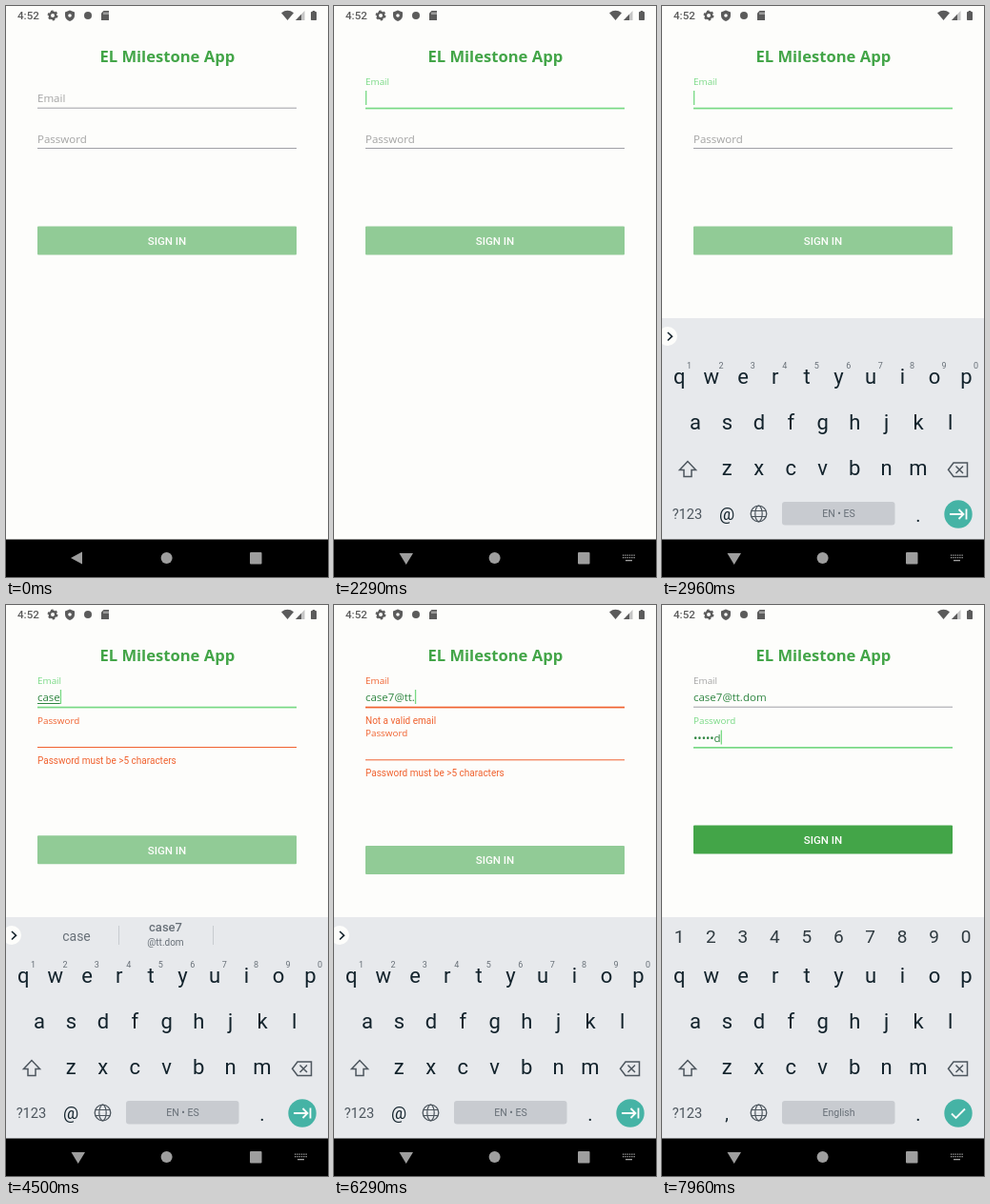
These frames come from a looping animation (338x600 px, 8 s). An HTML page:

```html
<!DOCTYPE html>
<html lang="en">
<head>
<meta charset="utf-8">
<title>Sign in</title>
<style>
html, body { margin: 0; width: 100%; height: 100%; overflow: hidden; background: #fdfdfb; }
svg { display: block; }
text { font-family: Roboto, sans-serif; }
.os { font-family: "Open Sans", sans-serif; }
.mid { text-anchor: middle; }
.med { font-weight: 500; }
.bold { font-weight: 700; }
</style>
</head>
<body>
<svg id="stage" width="338" height="600" viewBox="0 0 338 600"></svg>
<script>
const LOOP = 8000, FOCUS = 2080, NEXT = 6900;
const EMAIL = "case7@tt.dom";
const EMAIL_KEYS = [3220, 3580, 3950, 4330, 4830, 5190, 5540, 5800, 6130, 6420, 6560, 6710];
const PASS = "passwd";
const PASS_KEYS = [7120, 7290, 7460, 7620, 7790, 7920];
const C = {
  back: "#fdfdfb", hint: "#a3a3a3", line: "#a0a0a6", light: "#78d984", dark: "#2e8540",
  green: "#43a548", pale: "#91cb96", error: "#f0622f", icon: "#9e9e9e", status: "#5b5b5b",
  board: "#e7e9ec", space: "#c8cbd0", key: "#13232c", soft: "#687078", grey: "#4d565e"
};
const stage = document.getElementById("stage");
const pen = document.createElement("canvas").getContext("2d");

const text = (x, y, s, size, fill, cls = "") =>
  `<text x="${x}" y="${y}" font-size="${size}" fill="${fill}" class="${cls}">${s}</text>`;
const rect = (x, y, w, h, fill, r = 0) =>
  `<rect x="${x}" y="${y}" width="${w}" height="${h}" fill="${fill}" rx="${r}"/>`;
const circle = (x, y, r, fill, more = "") =>
  `<circle cx="${x}" cy="${y}" r="${r}" fill="${fill}" ${more}/>`;
const path = (d, fill) => `<path d="${d}" fill="${fill}"/>`;
const stroke = (d, color, w = 1.5) =>
  `<path d="${d}" fill="none" stroke="${color}" stroke-width="${w}"/>`;

const clamp = p => Math.min(1, Math.max(0, p));
const ramp = (t, start, length) => {
  const p = clamp((t - start) / length);
  return p * p * (3 - 2 * p);
};
const typed = (keys, t) => keys.filter(k => k <= t).length;
const width = s => {
  pen.font = '11.5px "Open Sans", sans-serif';
  return pen.measureText(s).width;
};

function statusBar() {
  const c = C.status;
  return text(12, 14.2, "4:52", 11.6, c, "med")
    + circle(49, 10, 3.2, "none", `stroke="${c}" stroke-width="2.4"`)
    + circle(49, 10, 4.6, "none", `stroke="${c}" stroke-width="1.7" stroke-dasharray="2.4 2.4"`)
    + path("M67 4.5L72 6.5V10Q72 14 67 16Q62 14 62 10V6.5Z", c)
    + circle(67, 10, 1.8, C.back)
    + circle(86, 10, 4, c)
    + path("M102.5 5H108V15H100V7.5Z", c)
    + stroke("M103 6.5V9M105 6.5V9M107 6.5V9", C.back, .8)
    + path("M289 7.2Q295.5 2.5 302 7.2L295.5 15Z", c)
    + path("M304 15L313.5 5V15Z", "#c4c4c4")
    + path("M304 15L310 8.7V15Z", c)
    + rect(320, 6, 6, 9, c, .7) + rect(321.7, 5, 2.6, 1.5, c);
}

function navBar(open) {
  let s = rect(0, 560.5, 338, 39.5, "#000")
    + path(open ? "M68.5 575H83L75.7 587Z" : "M68 580L80 573.5V586.5Z", C.icon)
    + circle(168.6, 580, 6, C.icon) + rect(256, 574, 12.5, 12.5, C.icon, 1);
  if (open) {
    for (let i = 0; i < 12; i++)
      s += rect(303 + i % 6 * 2.3, 576.5 + Math.floor(i / 6) * 2.5, 1.3, 1.3, C.icon);
    s += rect(306, 582, 7, 1.3, C.icon);
  }
  return s;
}

function keyRow(keys, x, y) {
  return [...keys].map((k, i) => text(x + i * 33.45, y, k, 22, C.key, "mid")).join("");
}

function strip(word) {
  let s = circle(6, 347, 10, C.back) + stroke("M6 343L10.5 347.2L6 351.5", C.key, 1.6);
  if (word && !word.includes("@")) {
    s += text(74, 353, word, 14, C.soft, "mid")
      + text(167.5, 343, EMAIL.slice(0, 5), 13, C.soft, "mid med")
      + text(167.5, 357.5, EMAIL.slice(5), 10, C.soft, "mid")
      + rect(118, 337, 1, 20, C.space) + rect(217, 337, 1, 20, C.space);
  }
  return s;
}

function keyboard(onPass, word) {
  const { grey } = C, digits = [..."1234567890"];
  let s = rect(0, 328, 338, 233, C.board);
  s += onPass
    ? digits.map((d, i) => text(18 + i * 33.45, 355, d, 19, "#2f3a40", "mid")).join("")
    : strip(word) + digits.map((d, i) => text(28.5 + i * 33.45, 380.5, d, 9, C.soft, "mid")).join("");
  s += keyRow("qwertyuiop", 18.3, 396.5) + keyRow("asdfghjkl", 35, 444.5) + keyRow("zxcvbnm", 68.3, 493);
  s += stroke("M27 478.5L18.5 487.5H23V494.5H31V487.5H35.5Z", grey)
    + stroke("M306 480H320.5V494.5H306L300.5 487.2ZM308.5 483.5L316 491M316 483.5L308.5 491", grey)
    + text(26.5, 539, "?123", 14.7, grey, "mid")
    + text(68, onPass ? 541 : 539.5, onPass ? "," : "@", 18, C.key, "mid");
  s += circle(101.5, 533.5, 8.3, "none", `stroke="${grey}" stroke-width="1.3"`)
    + `<ellipse cx="101.5" cy="533.5" rx="3.7" ry="8.3" fill="none" stroke="${grey}" stroke-width="1.2"/>`
    + stroke("M94 530.5H109M94 536.5H109", grey, 1.2);
  s += rect(126, 521, 118.5, 24.5, C.space, 3)
    + text(185.5, 537, onPass ? "English" : "EN • ES", 10.5, C.soft, "mid")
    + text(269, 541.5, ".", 20, C.key, "mid")
    + circle(311, 534, 14.7, "#45b3a5");
  return s + (onPass
    ? stroke("M304 534.5L308.5 539L318 529.5", C.back, 1.8)
    : stroke("M302 534H316M311.5 529L316.5 534L311.5 539M319.5 528.5V539.5", C.back, 1.8));
}

// Hint that shrinks and rises above its line as p goes from 0 to 1
const label = (s, y, p, fill) => text(33, y - 18.5 * p, s, 11.5 - 1.65 * p, fill, "os");
const caret = (s, y) => rect(33 + width(s), y - 12, 1.3, 15, C.light);
const warning = (s, y, p) => `<g opacity="${p}">${text(33, y - 4 * (1 - p), s, 10, C.error)}</g>`;

function form(t) {
  const n = typed(EMAIL_KEYS, t), m = typed(PASS_KEYS, t);
  const email = EMAIL.slice(0, n);
  const pass = m ? "•".repeat(m - 1) + PASS[m - 1] : "";
  const onEmail = t >= FOCUS && t < NEXT, onPass = t >= NEXT;
  const badEmail = n >= 6 && n < 10, badPass = n > 0 && m < 6, valid = m === 6;
  const drop = badEmail ? 13.3 : 0;
  const tone = (bad, focus, idle) => bad ? C.error : focus ? C.light : idle;

  let s = text(169.3, 59, "EL Milestone App", 16.6, C.green, "os bold mid");

  s += label("Email", 101, ramp(t, FOCUS, 167), tone(badEmail, onEmail, C.hint))
    + text(33, 101, email, 11.5, C.dark, "os")
    + rect(33, 106.7, 272, onEmail ? 1.7 : 1, tone(badEmail, onEmail, C.line));
  if (n && n < 6) s += rect(33, 103, width(email), 1, C.dark);
  if (badEmail) s += warning("Not a valid email", 125, ramp(t, EMAIL_KEYS[5], 167));

  s += label("Password", 143.5 + drop, ramp(t, EMAIL_KEYS[0], 167), tone(badPass, onPass, C.hint))
    + text(33, 143.5, pass, 11.5, C.dark, "os")
    + rect(33, 149 + drop, 272, onPass ? 1.7 : 1, tone(badPass, onPass, C.line));
  if (badPass) s += warning("Password must be >5 characters", 167 + drop, ramp(t, EMAIL_KEYS[0], 167));

  const last = Math.max(1940, ...[...EMAIL_KEYS, NEXT, ...PASS_KEYS].filter(k => k <= t));
  if (t >= FOCUS && (t - last) % 1000 < 500) s += onPass ? caret(pass, 143.5) : caret(email, 101);

  const top = 231.5 + (badPass ? 10.7 : 0) + (badEmail ? 10.8 : 0);
  return s + rect(33, top, 272, 30, valid ? C.green : C.pale, 1)
    + text(169, top + 19.3, "SIGN IN", 11.5, C.back, "mid med");
}

function draw(now) {
  const t = now % LOOP;
  const slide = 233 * (1 - clamp((t - 2310) / 250)) ** 2;
  const word = EMAIL.slice(0, typed(EMAIL_KEYS, t));
  stage.innerHTML = rect(0, 0, 338, 600, C.back) + statusBar() + form(t)
    + (slide < 233 ? `<g transform="translate(0 ${slide})">${keyboard(t >= NEXT, word)}</g>` : "")
    + navBar(t >= 2200);
}

const start = performance.now();
function tick() {
  draw(performance.now() - start);
  requestAnimationFrame(tick);
}
tick();
</script>
</body>
</html>
```
